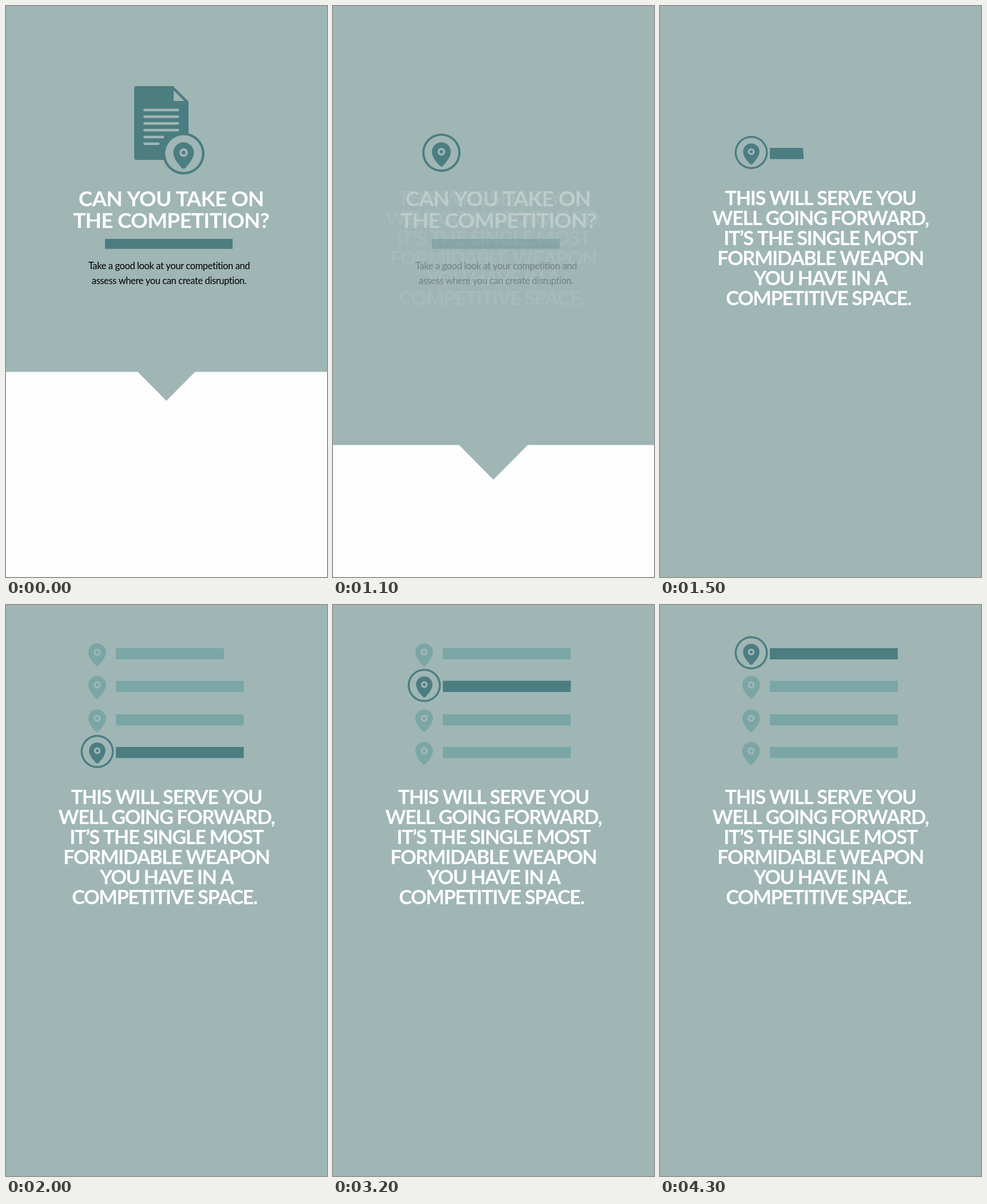
Animation, 561 px wide and 998 px high, one loop 5000 ms. Source, as an HTML page with a canvas:

```html
<!DOCTYPE html>
<html lang="en">
<head>
<meta charset="utf-8">
<title>Competition</title>
<style>
html, body { margin: 0; width: 100%; height: 100%; overflow: hidden; background: #9fb6b5; }
canvas { display: block; width: 561px; height: 998px; }
</style>
</head>
<body>
<canvas id="stage" width="561" height="998"></canvas>
<script>
const ctx = document.getElementById('stage').getContext('2d');
const W = 561, H = 998, LOOP = 5000, STEP = 100;
const BG = '#9fb6b5', DARK = '#4b7d81', LIGHT = '#7aa6a5', PAPER = '#fdfdfd';
const ROW_Y = [83.5, 140.5, 199, 256];
const BAR_X = 192, BAR_W = 223.5;

const clamp = x => Math.min(1, Math.max(0, x));
const lerp = (a, b, p) => a + (b - a) * p;
const ease = (t, start, len) => {
  const x = clamp((t - start) / len);
  return x * x * (3 - 2 * x);
};

function poly(color, ...pts) {
  ctx.fillStyle = color;
  ctx.beginPath();
  for (let i = 0; i < pts.length; i += 2) ctx.lineTo(pts[i], pts[i + 1]);
  ctx.closePath();
  ctx.fill();
}

function disc(color, x, y, r) {
  ctx.fillStyle = color;
  ctx.beginPath();
  ctx.arc(x, y, r, 0, 2 * Math.PI);
  ctx.fill();
}

function lines(rows, x, y, pitch, font, spacing, color) {
  ctx.font = font;
  ctx.letterSpacing = spacing;
  ctx.fillStyle = color;
  ctx.textAlign = 'center';
  rows.forEach((row, i) => ctx.fillText(row, x, y + i * pitch));
}

function panel(t) {
  const s = 1 + 0.6 * ease(t, 900, 517);
  ctx.fillStyle = PAPER;
  ctx.fillRect(0, 0, W, H);
  ctx.fillStyle = BG;
  ctx.fillRect(0, 0, W, 639.5 * s);
  const x = 280.3, y = 639 * s, half = 50.5 * s;
  poly(BG, x - half, y, x + half, y, x, 690 * s);
}

function heading(t) {
  ctx.globalAlpha = 1 - ease(t, 900, 310);
  lines(['CAN YOU TAKE ON', 'THE COMPETITION?'], 288.6, 350, 38,
    'bold 37px Lato, sans-serif', '-0.8px', '#fff');
  ctx.fillStyle = DARK;
  ctx.fillRect(173, 407, 223, 17.5);
  lines(['Take a good look at your competition and', 'assess where you can create disruption.'],
    285, 460, 25.5, '16.5px Lato, sans-serif', '-0.4px', '#000');
  ctx.globalAlpha = 1;
}

function message(t) {
  ctx.globalAlpha = ease(t, 1050, 300);
  lines(['THIS WILL SERVE YOU', 'WELL GOING FORWARD,', 'IT’S THE SINGLE MOST',
    'FORMIDABLE WEAPON', 'YOU HAVE IN A', 'COMPETITIVE SPACE. '],
    280.4, 348, 35, 'bold 34.4px Lato, sans-serif', '-1.45px', '#fff');
  ctx.globalAlpha = 1;
}

function sheet(t) {
  // The sheet is cropped towards the badge while its lines unwrite.
  const k = Math.pow(Math.max(0, (t - 650) / 150), 1.4);
  const left = 224 + 26 * k, top = 140 + 31 * k;
  const w = 319 - 5 * k - left, h = 269 - 8 * k - top;
  if (w <= 0 || h <= 0) return;
  ctx.save();
  ctx.beginPath();
  ctx.rect(left, top, w, h);
  ctx.clip();

  ctx.fillStyle = DARK;
  ctx.beginPath();
  ctx.moveTo(228, 140);
  ctx.lineTo(292, 140);
  ctx.lineTo(319, 167);
  ctx.lineTo(319, 269);
  ctx.arcTo(224, 269, 224, 140, 4);
  ctx.arcTo(224, 140, 292, 140, 4);
  ctx.closePath();
  ctx.fill();
  poly(BG, 293, 147.5, 293, 166, 311.5, 166);

  ctx.strokeStyle = BG;
  ctx.lineWidth = 4.5;
  ctx.lineCap = 'round';
  const written = 6 - 4.15 * k;
  [58, 58, 58, 58, 32, 24].forEach((len, i) => {
    const part = clamp(written - i);
    if (!part) return;
    const y = 181.7 + i * 11.8;
    ctx.beginPath();
    ctx.moveTo(242.2, y);
    ctx.lineTo(242.2 + len * part, y);
    ctx.stroke();
  });
  ctx.restore();
}

// Map pin, positioned by the centre of its head.
function pin(x, y, s, color) {
  ctx.save();
  ctx.translate(x, y);
  ctx.scale(s, s);
  ctx.fillStyle = color;
  ctx.beginPath();
  ctx.arc(0, 0, 18, Math.PI, 0);
  ctx.bezierCurveTo(18, 11, 8, 21, 3, 27);
  ctx.quadraticCurveTo(0, 29.5, -3, 27);
  ctx.bezierCurveTo(-8, 21, -18, 11, -18, 0);
  ctx.fill();
  disc(BG, 0, 0, 7.4);
  disc(color, 0, 0, 3.2);
  ctx.restore();
}

function badge(x, y, s) {
  disc(DARK, x, y, 36.5 * s);
  disc(BG, x, y, 32.2 * s);
  pin(x, y - 1.8 * s, s, DARK);
}

function bar(y, part, color) {
  if (part <= 0) return;
  const end = BAR_X + BAR_W * part, lean = part < 1 ? 1.2 : 0;
  poly(color, BAR_X, y, end, y, end + lean, y + 19.5, BAR_X, y + 19.5);
}

function list(t) {
  ROW_Y.forEach((y, i) => {
    const last = i === 3;
    if (last && t < 2300) return;
    const start = 1500 + 100 * (2 - i);
    ctx.globalAlpha = last ? 1 : ease(t, start, 200);
    pin(159.3, y - 1, 0.855, LIGHT);
    ctx.globalAlpha = 1;
    bar(y - 8, last ? 1 : ease(t, start, 400), LIGHT);
  });
}

function marker(t) {
  const move = ease(t, 850, 350), shrink = ease(t, 900, 460);
  let y = lerp(258, ROW_Y[3], move);
  [2200, 2800, 3400].forEach((start, i) => {
    y += (ROW_Y[2 - i] - ROW_Y[3 - i]) * ease(t, start, 400);
  });
  bar(y - 8, ease(t, 1350, 450), DARK);
  badge(lerp(310.4, 159.5, move), y, lerp(1, 0.795, shrink));
}

function draw(now) {
  const t = Math.floor((now % LOOP) / STEP) * STEP;
  panel(t);
  message(t);
  heading(t);
  sheet(t);
  list(t);
  marker(t);
}

const born = performance.now();
function tick() {
  draw(performance.now() - born);
  requestAnimationFrame(tick);
}
tick();
</script>
</body>
</html>
```
